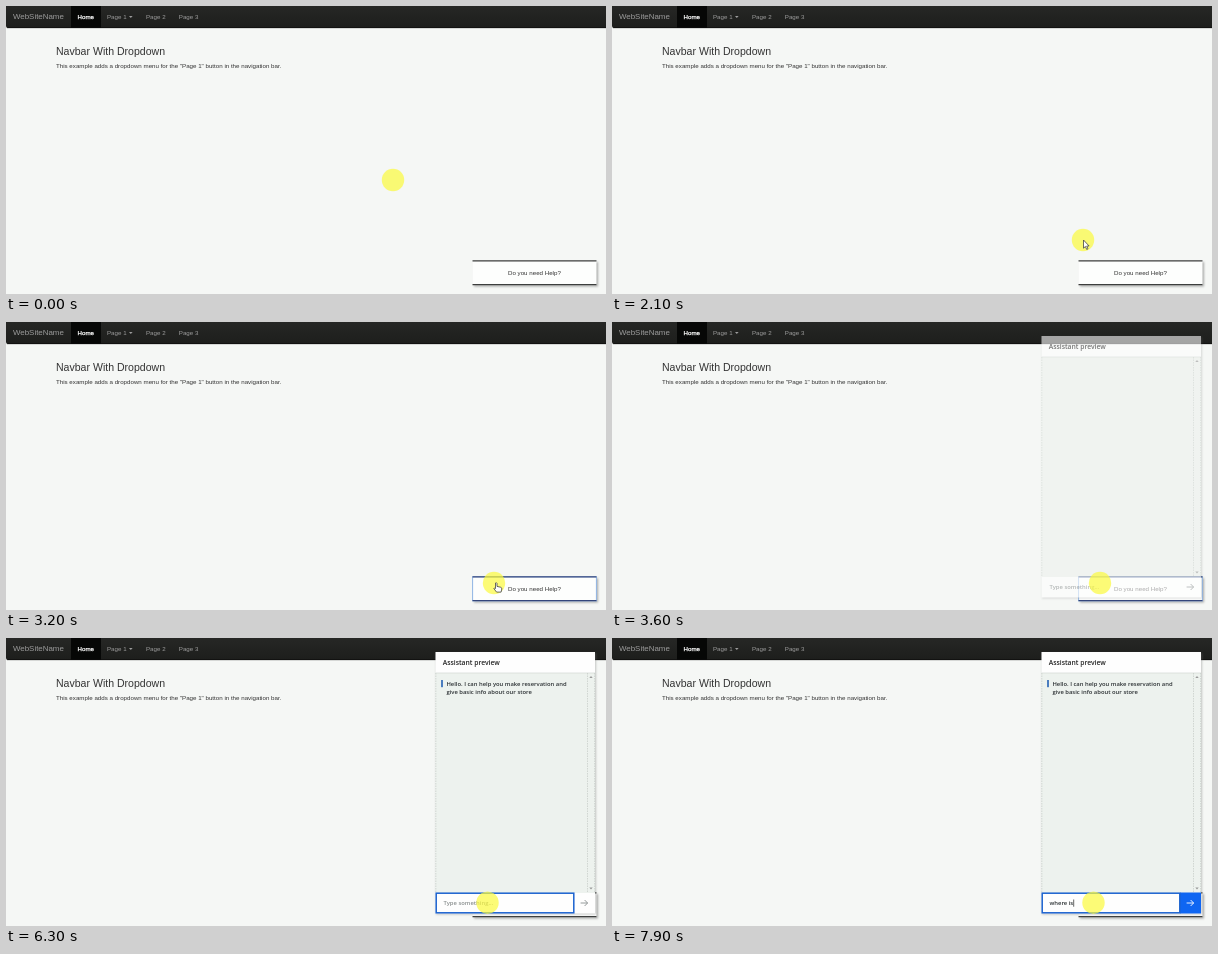
Animation, 600 px wide and 288 px high, one loop 8000 ms. Source, as an HTML page:

```html
<!DOCTYPE html>
<html lang="en">
<head>
<meta charset="utf-8">
<title>Help chat</title>
<style>
  html, body { margin: 0; width: 100%; height: 100%; overflow: hidden; background: #f5f7f5; }
  svg { display: block; }
  text { font: 6.18px "Liberation Sans", Arial, sans-serif; fill: #333; white-space: pre; }
  .nav text { fill: #9d9d9d; }
  .nav .brand { font-size: 7.92px; }
  .nav .active { fill: #fff; stroke: #fff; stroke-width: .25px; }
  .title { font-size: 10.55px; }
  .chat text { font: 600 5.86px "Open Sans", "Noto Sans", sans-serif; fill: #2b3033; }
  .chat .head { font-size: 6.77px; fill: #222; }
  .chat .hint { fill: #8a8f8f; }
</style>
</head>
<body>
<svg width="600" height="288" viewBox="0 0 600 288">
  <defs>
    <linearGradient id="bar" x2="0" y2="1">
      <stop stop-color="#262725"/><stop offset="1" stop-color="#1d1e1c"/>
    </linearGradient>
    <filter id="soft" x="-10%" y="-20%" width="120%" height="140%"><feGaussianBlur stdDeviation="1"/></filter>
  </defs>
  <rect width="600" height="288" fill="#f5f7f5"/>

  <g class="nav">
    <path d="M0 0H600V22H2Q0 22 0 20Z" fill="url(#bar)"/>
    <path d="M1 21.7H600" stroke="#0b0b0b" stroke-width=".7"/>
    <rect x="65" width="30" height="21.7" fill="#060706"/>
    <text class="brand" x="7" y="13.3">WebSiteName</text>
    <text class="active" x="71.5" y="12.9">Home</text>
    <text x="101" y="12.9">Page 1</text>
    <path d="M123 10h3.6l-1.8 1.9z" fill="#9d9d9d"/>
    <text x="140" y="12.9">Page 2</text>
    <text x="172.8" y="12.9">Page 3</text>
  </g>

  <text class="title" x="50" y="49.2">Navbar With Dropdown</text>
  <text x="50" y="62.2">This example adds a dropdown menu for the "Page 1" button in the navigation bar.</text>

  <g>
    <rect x="468" y="256" width="124" height="24.5" fill="#777" opacity=".6" filter="url(#soft)"/>
    <rect x="466.5" y="254.2" width="124" height="25" fill="#fdfefd"/>
    <rect id="glow" x="466.6" y="254.8" width="123.8" height="24" fill="none" stroke="#8fb4e4"/>
    <path id="edges" d="M466.5 254.8H590.5M466.5 278.7H590.5" stroke-width="1.3"/>
    <text x="502" y="269.2">Do you need Help?</text>
  </g>

  <g class="chat" id="chat">
    <rect x="430" y="15" width="160" height="261.5" fill="#777" opacity=".4" filter="url(#soft)"/>
    <rect x="429.5" y="14" width="159.5" height="261.5" fill="#fefefe"/>
    <rect x="429.5" y="35" width="159.5" height="220" fill="#edf2ee"/>
    <path d="M429.5 35H589" stroke="#d5dad6" stroke-width=".8"/>
    <path d="M429.8 35V255M581.5 35V255M588.6 35V255" stroke="#c3cac5" stroke-width=".7" stroke-dasharray="1.5 1"/>
    <path d="M583.3 40l1.7-2 1.7 2zM583.3 249.5l1.7 2 1.7-2z" fill="#999"/>
    <text class="head" x="436.7" y="27">Assistant preview</text>
    <g id="message">
      <rect x="435.2" y="42" width="1.6" height="7.2" fill="#2460b4"/>
      <text x="440.4" y="48">Hello. I can help you make reservation and</text>
      <text x="440.4" y="56.2">give basic info about our store</text>
    </g>
    <rect id="send" x="568" y="254.5" width="21" height="21" fill="#0f66f2"/>
    <rect id="focus" x="430.2" y="255.2" width="137.6" height="19.6" fill="#fefefe" stroke="#1b62cf" stroke-width="1.5"/>
    <text id="input" x="437.5" y="267.2"></text>
    <path id="caret" d="M0 261.5v7.2" stroke="#222" stroke-width=".7"/>
    <path id="arrow" d="M574.6 265h7M578.6 262l3 3-3 3" fill="none" stroke-width=".9"/>
  </g>

  <g id="pointer">
    <circle r="11.2" fill="#fbfa3c" fill-opacity=".7"/>
    <circle id="ring" r="9.3" fill="#f6e94c" fill-opacity=".45" stroke="#c3220f" stroke-width="1.5"/>
    <path id="cursor" d="M.5 0V8.2l1.9-1.7 1.3 2.9 1.3-.6-1.3-2.8h2.4z" fill="#fff" stroke="#444" stroke-width=".8"/>
    <path id="hand" d="M1.5 0q1-.8 1.5.4v3l3.9.9q1 .4.9 1.6l-.7 3.2H2.6L-.1 5.7q-.1-1.3 1.6-.1z" fill="#fff" stroke="#444" stroke-width=".8"/>
  </g>
</svg>
<script>
const LOOP = 8000, STEP = 100;
const el = {};
document.querySelectorAll("[id]").forEach(e => el[e.id] = e);

const path = [[0, 387, 174], [1700, 387, 174], [1800, 440, 193], [2100, 471, 234],
  [2500, 488, 261], [4300, 488, 261], [4500, 481.5, 264.7], [LOOP, 481.5, 264.7]];
const keys = [6700, 6800, 6900, 7100, 7200, 7500, 7700, 7900];

const ramp = (t, a, b) => Math.min(1, Math.max(0, (t - a) / (b - a)));
const within = (t, a, b) => t >= a && t < b;
const show = (e, on) => e.style.display = on ? "" : "none";

function position(t) {
  const i = path.findIndex(p => p[0] > t);
  const [a, x, y] = path[i - 1], [b, u, v] = path[i];
  const k = ramp(t, a, b);
  return [x + (u - x) * k, y + (v - y) * k];
}

function draw(t) {
  el.pointer.setAttribute("transform", `translate(${position(t)})`);
  show(el.cursor, within(t, 100, 2500));
  show(el.hand, within(t, 2500, 3600));
  show(el.ring, within(t, 3100, 3200) || within(t, 4500, 4700));

  const pressed = within(t, 3100, 4700);
  show(el.glow, pressed);
  el.edges.setAttribute("stroke", pressed ? "#34477c" : "#3c3e3d");

  el.chat.style.opacity = ramp(t, 3300, 3800);
  el.message.style.opacity = ramp(t, 3600, 4100);

  const focused = t >= 4700;
  const typed = "where is".slice(0, keys.filter(k => k <= t).length);
  show(el.focus, focused);
  el.input.textContent = typed || "Type something...";
  el.input.setAttribute("class", typed ? "" : "hint");
  el.send.style.opacity = ramp(t, 6600, 6900);
  el.arrow.setAttribute("stroke", typed ? "#fff" : "#8a8f8f");

  const blink = within(t, 4700, 5200) || within(t, 5700, 6300);
  show(el.caret, typed || blink);
  const x = 437.5 + (typed ? el.input.getComputedTextLength() + .5 : 0);
  el.caret.setAttribute("transform", `translate(${x})`);
}

function tick() {
  draw(Math.floor(performance.now() % LOOP / STEP) * STEP);
  requestAnimationFrame(tick);
}
tick();
</script>
</body>
</html>
```
